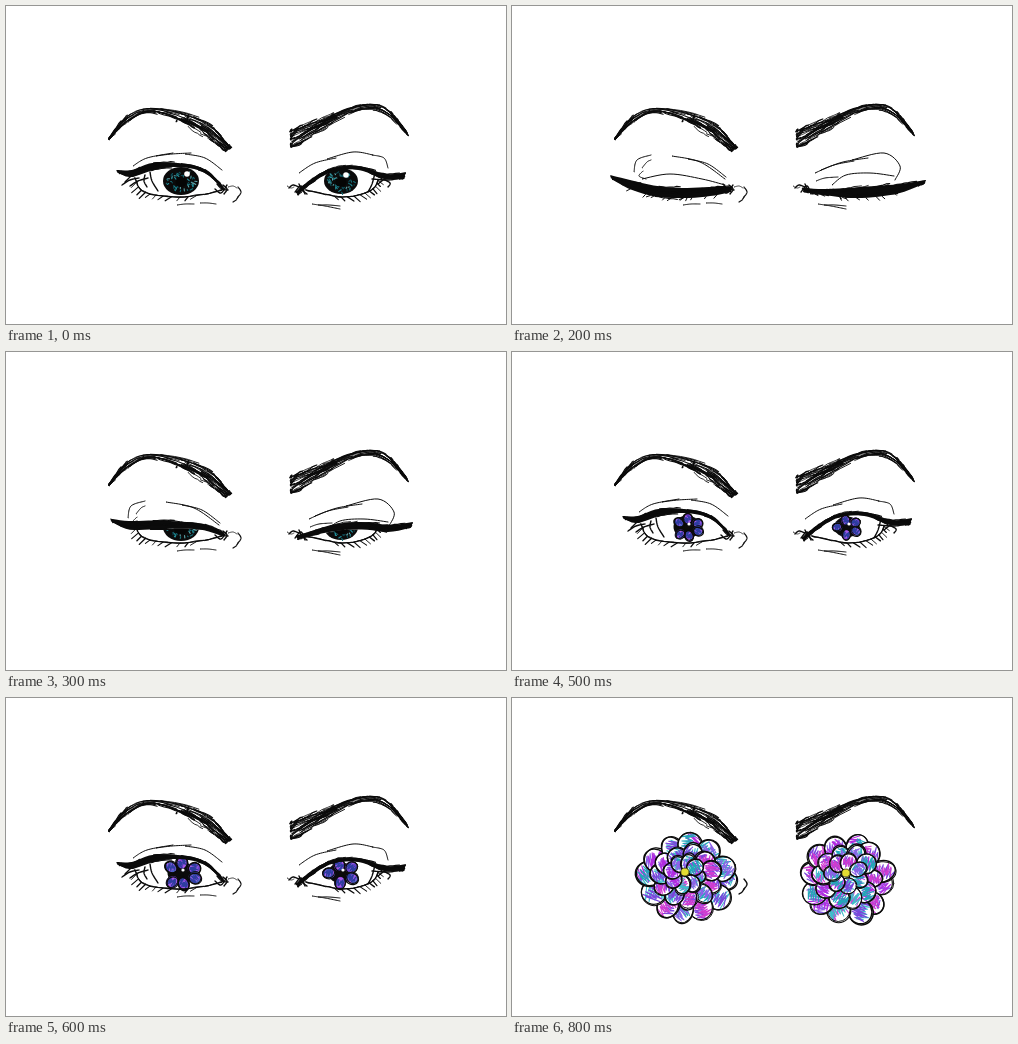
Write an HTML page with a canvas that moves like this. It is 500 px wide and 318 px high and loops after 1 s.

```html
<!DOCTYPE html>
<html lang="en">
<head>
<meta charset="utf-8">
<title>Blooming eyes</title>
<style>
html, body { margin: 0; width: 100%; height: 100%; overflow: hidden; background: #fff; }
canvas { display: block; width: 500px; height: 318px; }
</style>
</head>
<body>
<canvas id="stage" width="500" height="318"></canvas>
<script>
const ctx = document.getElementById('stage').getContext('2d');
const TAU = Math.PI * 2, INK = '#0b0b0b';
let state = 1;
const seed = n => { state = n; };
const rnd = (a = 1, b = 0) => {
  state = (state * 16807) % 2147483647;
  return b + (a - b) * state / 2147483647;
};
const jit = a => rnd(a, -a);
const mix = (a, b, t) => a + (b - a) * t;
const mixPt = (p, q, t) => [mix(p[0], q[0], t), mix(p[1], q[1], t)];
const pts = s => s.split(' ').map(p => p.split(',').map(Number));

// Catmull-Rom point on a list of knots, t in 0..1
function at(k, t) {
  const n = k.length - 1, f = Math.min(Math.max(t, 0), 1) * n;
  const i = Math.min(Math.floor(f), n - 1), u = f - i;
  const [a, b, c, d] = [k[Math.max(i - 1, 0)], k[i], k[i + 1], k[Math.min(i + 2, n)]];
  return [0, 1].map(j => b[j] + u * (c[j] - a[j]) / 2 +
    u * u * (a[j] - 2.5 * b[j] + 2 * c[j] - d[j] / 2) +
    u * u * u * (1.5 * (b[j] - c[j]) + (d[j] - a[j]) / 2));
}
const sample = (k, n = 24) => Array.from({ length: n + 1 }, (_, i) => at(k, i / n));

function trace(list) {
  ctx.beginPath();
  list.forEach(p => ctx.lineTo(p[0], p[1]));
}
function stroke(w, color = INK) {
  ctx.lineWidth = w;
  ctx.strokeStyle = color;
  ctx.stroke();
}
function line(s, w = 1.1) {
  trace(sample(pts(s)));
  stroke(w);
}
const lines = (list, w) => list.forEach(s => line(s, w));

function outline(a, b) {
  trace([...sample(a), ...sample(b).reverse()]);
  ctx.closePath();
}

// Loose strokes running along the strip between two curves
function band(a, b, n, len, w, spread = 0) {
  for (let i = 0; i < n; i++) {
    const t = (i + rnd()) / n * (1 + len) - len, v = rnd(), u = v + jit(0.35);
    const t0 = Math.max(t, 0), t1 = Math.min(t + len, 1);
    const list = [];
    for (let j = 0; j <= 6; j++) {
      const s = mix(t0, t1, j / 6);
      const p = mixPt(at(a, s), at(b, s), Math.min(Math.max(mix(v, u, j / 6), -0.1), 1.1));
      list.push([p[0] + jit(spread), p[1] + jit(spread)]);
    }
    trace(list);
    stroke(rnd(w, w * 0.55));
  }
}

const brows = [
  { top: pts('103,132 121,110 146,102 184,109 209,123 226,141'),
    low: pts('103,134 120,118 141,107 170,115 196,129 220,145'), dense: [0.6, 1] },
  { top: pts('284,125 309,115 340,103 365,98 383,104 400,125'),
    low: pts('285,142 314,125 344,108 366,104 384,112 402,129'), dense: [0, 0.32] }
];

const eyes = [
  {
    c: [175, 175], r: [18, 14], glint: [181, 168],
    openTop: pts('110,164 126,164 146,157 172,157 198,163 217,181'),
    openLow: pts('114,168 126,171 148,164 174,161 199,167 217,184'),
    shutTop: pts('98,169 118,174 145,180 172,182 198,181 219,181'),
    shutLow: pts('101,174 120,184 146,191 174,192 199,190 219,186'),
    under: pts('129,172 135,184 150,189 175,191 200,188 216,184'),
    crease: ['127,160 141,152 167,147', '179,148 199,152 216,164', '150,150 166,148 185,147'],
    shutLid: ['122,166 125,154 139,149', '131,165 127,170 134,173', '160,150 188,156 213,173',
      '176,153 196,158 214,171', '130,173 158,168 190,173 213,179', '130,162 135,156 139,154'],
    wing: ['116,179 124,174 133,172', '119,176 128,168 138,166', '124,180 132,175 142,172',
      '144,166 146,175 152,185', '139,169 138,175 141,181'],
    corner: ['209,183 215,187 221,179', '217,179 221,183 218,188', '211,178 216,183 222,184'],
    marks: ['171,199 179,198 188,198', '194,197 202,197 210,198'],
    tear: ['232,181 235,186 232,191', '232,191 230,194 227,196'],
    tick: '222,181 227,180 231,182',
    lash: [0.08, 0.72, -1],
    rest: ['128,161 140,153 157,149', '113,177 121,169 139,164', '116,174 127,170 141,169',
      '119,176 130,178 139,185', '130,166 134,174 132,180', '205,172 216,171 222,176', '213,178 218,183 215,187'],
    bud: '165,169 176,165 188,170 189,180 178,186 166,184'
  },
  {
    c: [335, 175], r: [17, 13], glint: [340, 169],
    openTop: pts('290,186 304,174 326,162 352,160 380,168 400,166'),
    openLow: pts('292,189 306,177 328,165 353,164 378,173 398,173'),
    shutTop: pts('290,182 310,183 335,182 362,180 388,178 414,174'),
    shutLow: pts('292,186 312,189 337,192 363,191 388,187 412,178'),
    under: pts('300,184 318,188 338,191 356,188 368,182 372,174'),
    crease: ['293,167 309,157 330,152', '321,153 347,146 367,149', '366,149 378,152 382,162'],
    shutLid: ['303,167 322,159 342,155', '309,164 331,156 356,152', '340,154 372,147 388,160 383,174',
      '320,179 334,169 358,167 382,170', '304,175 313,172 326,171'],
    wing: ['366,173 383,174 397,171', '372,178 379,173 389,171', '369,167 366,178 362,186',
      '377,173 384,177 382,181'],
    corner: ['283,182 287,179 293,181', '289,186 295,180 299,188', '293,178 296,184 301,188'],
    marks: ['306,198 319,200 334,203', '312,199 323,199 334,200'],
    tear: [], tick: '281,180 285,182 288,181',
    lash: [0.3, 0.98, 1],
    rest: ['296,166 309,158 324,152', '348,147 366,149 380,158', '296,186 301,178 312,166',
      '294,184 300,186 309,188', '370,185 382,181 380,173', '371,176 376,182 383,184', '372,158 377,162 380,158'],
    bud: '323,175 333,167 345,169 346,180 334,185'
  }
];

function drawBrows() {
  brows.forEach((b, i) => {
    seed(71 + i * 900);
    band(b.top, b.low, 72, 0.2, 1.25, 0.25);
    const cut = k => Array.from({ length: 5 }, (_, j) => at(k, mix(...b.dense, j / 4)));
    band(cut(b.top), cut(b.low), 38, 0.32, 1.4, 0.5);
    const tip = i ? [0.82, 1] : [0, 0.2];
    const end = k => Array.from({ length: 4 }, (_, j) => at(k, mix(...tip, j / 3)));
    band(end(b.top), end(b.low), 12, 0.6, 1.5, 0.2);
  });
}

function oval(x, y, rx, ry, a = 0) {
  ctx.beginPath();
  ctx.ellipse(x, y, rx, ry, a, 0, TAU);
}
function dot(x, y, rx, ry, color) {
  oval(x, y, rx, ry);
  ctx.fillStyle = color;
  ctx.fill();
}

function iris(e, wide) {
  const [x, y] = e.c, [rx, ry] = e.r;
  dot(x, y, rx, ry, INK);
  for (let i = 0; i < 46; i++) {
    const a = rnd(TAU), d = rnd(0.82, wide ? 0.48 : 0.38);
    const px = x + Math.cos(a) * rx * d, py = y + 1 + Math.sin(a) * ry * d;
    trace([[px, py], [px + jit(2.5), py + jit(2.5)]]);
    stroke(1.1, ['#16707a', '#23909c', '#0c4a55', '#5fa5aa'][i % 4]);
  }
  dot(x, y + 1, wide ? 7.5 : 5.5, wide ? 6.5 : 5, '#050505');
  dot(...e.glint, wide ? 1.8 : 2.8, wide ? 1.6 : 2.8, '#fff');
}

function petal(x, y, a, l, w, color, base = '#fff') {
  oval(x, y, l, w, a);
  ctx.fillStyle = base;
  ctx.fill();
  ctx.save();
  ctx.clip();
  for (let k = 0; k < 2; k++) {
    const tilt = rnd(TAU), c = Math.cos(tilt), s = Math.sin(tilt), list = [];
    for (let u = -0.8; u <= 0.7; u += 0.2) {
      for (const side of [-1, 1]) {
        const p = u * l + jit(1), q = side * rnd(w * 0.8, w * 0.25);
        list.push([x + p * c - q * s, y + p * s + q * c]);
      }
    }
    trace(list);
    stroke(1.05, color[k]);
  }
  ctx.restore();
  for (let k = 0; k < 2; k++) {
    oval(x + jit(0.7), y + jit(0.7), l + jit(0.6), w + jit(0.6), a + jit(0.15));
    stroke(rnd(1.5, 0.9));
  }
}

const hues = ['#b22be0', '#7a45dc', '#22a7b8', '#d03bd0', '#8c62e8', '#3fbdca'];

function ring(x, y, rx, ry, n, size, turn) {
  for (let i = 0; i < n; i++) {
    const a = (i + turn) / n * TAU + jit(0.1), d = 1 + jit(0.06);
    const px = x + Math.cos(a) * rx * d, py = y + Math.sin(a) * ry * d;
    const h = Math.floor(rnd(6));
    petal(px, py, a, size * rnd(1.1, 0.95), size * rnd(1, 0.84), [hues[h], hues[(h + 2) % 6]]);
  }
}

function bud(e, size) {
  const [x, y] = e.c, list = pts(e.bud);
  dot(x, y, e.r[0] * 0.75, e.r[1] * 0.8, INK);
  list.forEach((p, i) => {
    const q = mixPt(e.c, p, size);
    const base = ['#4a60c4', '#7b35cf', '#6540c8'][i % 3];
    petal(...q, Math.atan2(p[1] - y, p[0] - x), 6.5 * size, 5.6 * size, ['#a65be8', '#2d3da0'], base);
  });
  dot(x, y, 3, 2.8, INK);
  dot(x + 2, y - 3, 1.6, 1.5, '#fff');
}

function eye(e, i, shut, core) {
  const blend = (a, b) => a.map((p, j) => mixPt(p, b[j], shut));
  const top = blend(e.openTop, e.shutTop), low = blend(e.openLow, e.shutLow);
  seed(311 + i * 77);
  if (shut < 1) {
    ctx.save();
    if (shut > 0) {
      outline(low, e.under);
      ctx.clip();
    }
    seed(505 + i);
    if (core === 'bud') bud(e, 1);
    else if (core === 'seedling') bud(e, 0.8);
    else iris(e, core === 'wide');
    ctx.restore();
    seed(640 + i);
    trace(sample(e.under));
    stroke(1.3);
    trace(sample(e.under).map(p => [p[0] + jit(0.7), p[1] + jit(0.7)]));
    stroke(0.9);
    const [t0, t1, dir] = e.lash;
    for (let k = 0; k < 11; k++) {
      const p = at(e.under, mix(t0, t1, k / 10));
      trace([p, [p[0] + dir * rnd(7, 3), p[1] + rnd(6, 3)]]);
      stroke(rnd(1.4, 0.8));
    }
    if (shut === 0) lines(e.wing, 1.4);
  }
  seed(820 + i);
  outline(top, low);
  ctx.fillStyle = INK;
  ctx.fill();
  band(top, low, 34, 0.16, 1.4, 0.4);
  if (shut === 1) {
    for (let k = 0; k < 12; k++) {
      const p = at(low, rnd(0.9, 0.1));
      trace([p, [p[0] + (i ? 1 : -1) * rnd(4, 1), p[1] + rnd(3.5, 1)]]);
      stroke(1);
    }
  }
  lines(shut >= 0.5 ? e.shutLid : e.crease, 1);
  lines(e.corner, 1.4);
  lines(e.marks, 1);
  line(e.tick, 0.8);
  lines(e.tear, 1.2);
}

const flowers = [
  // heart, then rings of [x, y, rx, ry, count, petal size, turn]
  [
    { heart: [173, 174], rings: [[175, 177, 29, 22.5, 11, 10, 0.25], [173, 175, 13, 11.5, 8, 8.5, 0.5]] },
    { heart: [341, 174], rings: [[338, 179, 26, 21.5, 9, 11.5, 0.3], [338, 176, 14, 11, 7, 9, 0.1]] }
  ],
  [
    { heart: [173, 174], rings: [[176, 181, 38, 32.5, 12, 12.5, 0.2], [175, 179, 26, 22, 11, 10.5, 0.6],
      [173, 176, 13, 12, 8, 8.5, 0.3]] },
    { heart: [334, 175], rings: [[335, 182, 35.5, 33, 12, 12.5, 0.4], [335, 179, 24, 22, 10, 10.5, 0.1],
      [334, 176, 13, 12, 7, 8.5, 0.5]] }
  ]
];

function bloom(stage) {
  flowers[stage].forEach((f, i) => {
    const e = eyes[i];
    lines(e.tear, 1.4);
    if (!stage) {
      lines(e.rest, 1.3);
      line(i ? '366,171 380,167 393,167' : '114,170 126,167 141,165', i ? 4 : 2.5);
    }
    seed(1290 + stage * 400 + i * 83);
    f.rings.forEach(r => ring(...r));
    oval(...f.heart, 4.2, 4);
    ctx.fillStyle = stage ? '#e4dc32' : '#fff';
    ctx.fill();
    stroke(stage ? 0.7 : 1.2);
  });
}

const gaze = (shut, core) => () => eyes.forEach((e, i) => eye(e, i, shut, core));
const steps = [
  [0, gaze(0, 'plain')],
  [100, gaze(0.5, 'plain')],
  [200, gaze(1)],
  [300, gaze(0.5, 'wide')],
  [400, gaze(0, 'wide')],
  [500, gaze(0, 'seedling')],
  [600, gaze(0, 'bud')],
  [700, () => bloom(0)],
  [800, () => bloom(1)]
];

ctx.lineCap = ctx.lineJoin = 'round';
let shown = -1;
const start = performance.now();
function tick() {
  const t = (performance.now() - start) % 1000;
  const now = steps.filter(s => s[0] <= t).length - 1;
  if (now !== shown) {
    shown = now;
    ctx.fillStyle = '#fff';
    ctx.fillRect(0, 0, 500, 318);
    drawBrows();
    steps[now][1]();
  }
  requestAnimationFrame(tick);
}
tick();
</script>
</body>
</html>
```
